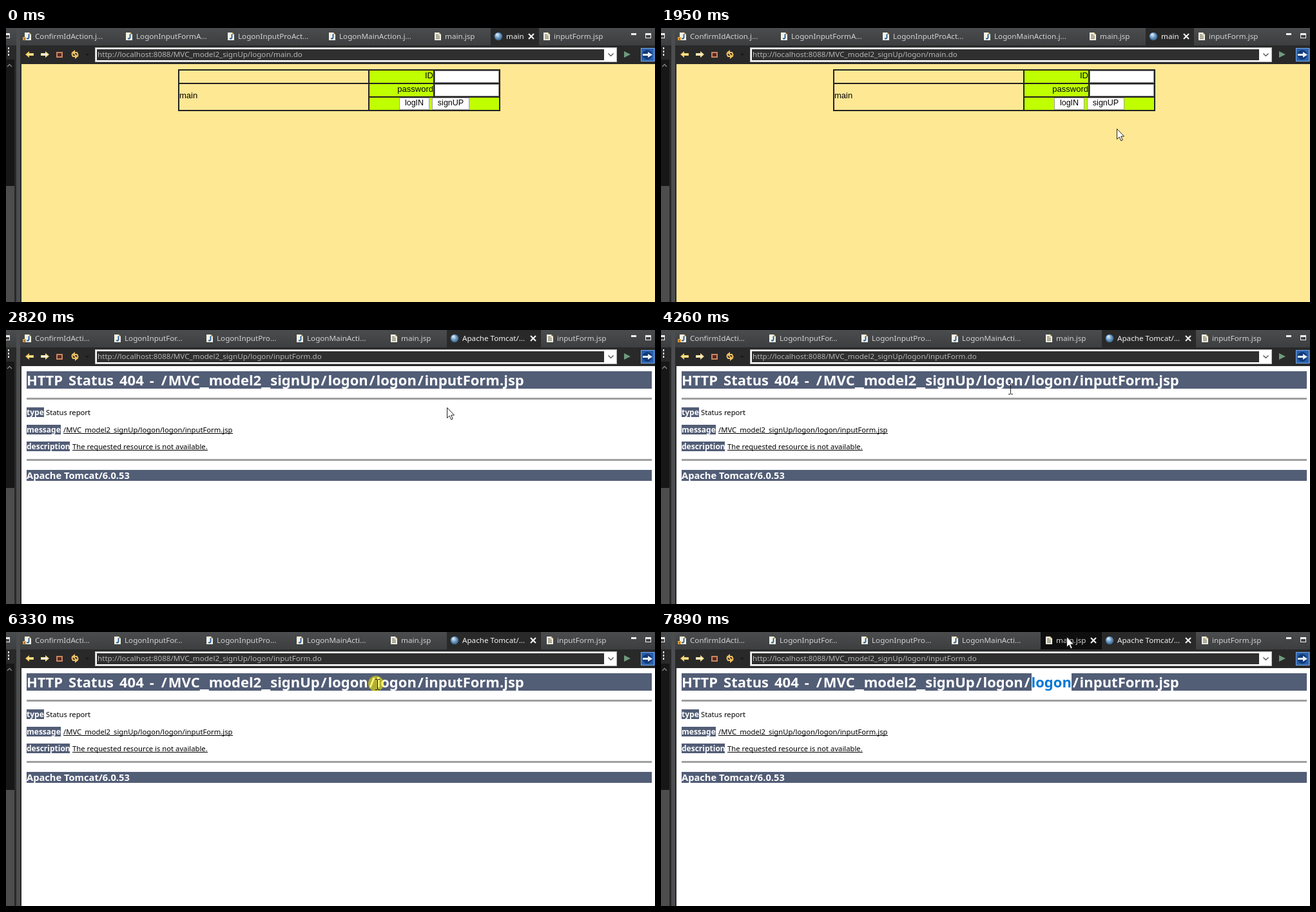
These frames come from a looping animation (1007x425 px, 8 s). An HTML page with a canvas:

```html
<!DOCTYPE html>
<html lang="en">
<head>
<meta charset="utf-8">
<title>Browser tab demo</title>
<style>
  html, body { margin: 0; width: 100%; height: 100%; overflow: hidden; background: #2b2b2b; }
  canvas { display: block; }
</style>
</head>
<body>
<canvas id="stage" width="1007" height="425"></canvas>
<script>
const ctx = document.getElementById('stage').getContext('2d');
const LOOP = 8000, PAGE_SWITCH = 2820;

const UI = '11.65px "Noto Sans", "Open Sans", sans-serif';
const BODY = '11.25px "Noto Sans", "Open Sans", sans-serif';
const LABEL = 'bold 12px "Noto Sans", "Open Sans", sans-serif';
const HEAD = 'bold 22px "Noto Sans", "Open Sans", sans-serif';
const FOOT = 'bold 14.7px "Noto Sans", "Open Sans", sans-serif';
const FORM = '13px "Liberation Sans", Arial, sans-serif';
const BUTTON = '12.5px "Liberation Sans", Arial, sans-serif';
const SLATE = '#525d76', DARK = '#292929';

// Pointer runs: first step, last step, number of steps, end point.
const START = [943, 360];
const RUNS = [
  [280, 500, 3, 847, 311],
  [1050, 1390, 4, 847, 307],
  [1500, 1830, 4, 718, 174],
  [1950, 2150, 3, 684, 120],
  [3360, 3480, 2, 684, 121],
  [3710, 4480, 8, 492, 80],
  [4900, 5360, 5, 547, 81],
  [5580, 5800, 3, 572, 91],
  [6130, 6130, 1, 574, 80],
  [6440, 6890, 5, 627, 80],
  [7010, 7130, 2, 631, 80],
  [7350, 7350, 1, 633, 90],
  [7570, 7890, 4, 629, 7]
];
const PRESSES = [[2610, 2700], [4790, 5580], [6130, 7350]];

function pointerAt(t) {
  let [x, y] = START;
  for (const [t0, t1, n, ex, ey] of RUNS) {
    if (t < t0) break;
    const dt = (t1 - t0) / (n - 1) || 1;
    const p = Math.min(n, Math.floor((t - t0) / dt + 1e-6) + 1) / n;
    x += (ex - x) * p;
    y += (ey - y) * p;
  }
  return { x: Math.round(x), y: Math.round(y) };
}

function rect(x, y, w, h, color) {
  ctx.fillStyle = color;
  ctx.fillRect(x, y, w, h);
}

function frame(x, y, w, h, color, line = 1) {
  ctx.strokeStyle = color;
  ctx.lineWidth = line;
  ctx.strokeRect(x + line / 2, y + line / 2, w - line, h - line);
}

function text(str, x, y, font, color, align = 'left') {
  ctx.font = font;
  ctx.fillStyle = color;
  ctx.textAlign = align;
  ctx.fillText(str, x, y);
}

function trace(points) {
  ctx.beginPath();
  points.forEach(([x, y]) => ctx.lineTo(x, y));
}

function poly(points, fill) {
  trace(points);
  ctx.closePath();
  ctx.fillStyle = fill;
  ctx.fill();
}

function polyline(points, color, width) {
  trace(points);
  ctx.strokeStyle = color;
  ctx.lineWidth = width;
  ctx.stroke();
}

function disc(x, y, r, fill) {
  ctx.beginPath();
  ctx.arc(x, y, r, 0, Math.PI * 2);
  ctx.fillStyle = fill;
  ctx.fill();
}

function fade(y0, y1, top, bottom) {
  const g = ctx.createLinearGradient(0, y0, 0, y1);
  g.addColorStop(0, top);
  g.addColorStop(1, bottom);
  return g;
}

// ---- window chrome ----

function pageIcon(x, java) {
  poly([[x, 7], [x + 7, 7], [x + 10, 10], [x + 10, 19], [x, 19]], '#f4f1e4');
  poly([[x + 7, 7], [x + 10, 10], [x + 7, 10]], '#c9a750');
  if (java) {
    polyline([[x + 6.5, 9.5], [x + 6.5, 15], [x + 5.5, 16.5], [x + 3, 16.3]], '#1f5b9c', 1.8);
  } else {
    rect(x + 2, 10, 4, 1, '#6d6d5a');
    for (const y of [12, 14, 16]) rect(x + 2, y, 6, 1, '#6d6d5a');
  }
}

function globe(x, y) {
  const g = ctx.createRadialGradient(x - 2, y - 3, 1, x, y, 7);
  g.addColorStop(0, '#d5e6f4');
  g.addColorStop(0.5, '#6f9cc4');
  g.addColorStop(1, '#2c5580');
  disc(x, y, 6.3, g);
}

function cross(x, y) {
  polyline([[x - 4, y - 4], [x + 4, y + 4]], '#f2f2f2', 2.2);
  polyline([[x + 4, y - 4], [x - 4, y + 4]], '#f2f2f2', 2.2);
}

function tab(x, label, java) {
  pageIcon(x - 16, java);
  text(label, x, 17, UI, '#d2d2d2');
}

function windowIcon(x) {
  frame(x, 8, 9, 8, '#f0f0f0');
  rect(x, 8, 9, 3, '#f0f0f0');
}

function tabs(second, hover) {
  const active = second ? [684, 146] : [752, 75];
  rect(active[0], 0, active[1], 27, DARK);
  if (hover) {
    rect(589, 0, 95, 27, '#0e0e0e');
    cross(671, 13);
  }
  const names = second
    ? ['ConfirmIdActi...', 'LogonInputFor...', 'LogonInputPro...', 'LogonMainActi...']
    : ['ConfirmIdAction.j...', 'LogonInputFormA...', 'LogonInputProAct...', 'LogonMainAction.j...'];
  const places = second ? [45, 184, 327, 467] : [45, 202, 360, 517];
  names.forEach((name, i) => tab(places[i], name, true));
  rect(26, 14, 5, 5, '#e0a040');
  rect(28, 16, 1, 2, '#5a3a10');
  tab(second ? 613 : 681, 'main.jsp');
  tab(second ? 855 : 850, 'inputForm.jsp');
  globe(second ? 696 : 764, 13);
  text(second ? 'Apache Tomcat/...' : 'main', second ? 708 : 776, 17, UI, '#f2f2f2');
  cross(second ? 818 : 815, 13);
  rect(970, 8, 8, 3, '#f0f0f0');
  windowIcon(992);
}

function arrowIcon(x, dir, fill, core) {
  const p = [[-7, 0], [-1, -5], [-1, -2], [6, -2], [6, 2], [-1, 2], [-1, 5]];
  poly(p.map(([dx, dy]) => [x + dx * dir, 41 + dy]), fill);
  polyline([[x - 4 * dir, 41], [x + 5 * dir, 41]], core, 1.6);
}

function refreshIcon(x, y) {
  for (const d of [1, -1]) {
    const at = (points) => points.map(([dx, dy]) => [x + dx * d, y + dy * d]);
    polyline(at([[-1, -3], [3, -3], [4.5, 0], [4, 3]]), '#f0c060', 2);
    poly(at([[-5, -3], [0, -7], [0, 1]]), '#f0c060');
  }
}

function externalIcon() {
  rect(985, 31, 22, 21, '#2a60ad');
  frame(985, 31, 21, 21, '#79a9e0');
  disc(995, 41.5, 7.5, '#123a78');
  rect(988, 40, 9, 3, '#e8f0fa');
  poly([[996, 37], [1003, 41.5], [996, 46]], '#e8f0fa');
}

function toolbar(second, hover) {
  rect(22, 27, 985, 29, DARK);
  arrowIcon(37, 1, '#f5c95e', '#ffeeb0');
  arrowIcon(60, -1, '#f7dc92', '#ffffff');
  frame(78, 37, 10, 9, '#c98560', 2);
  rect(80, 39, 6, 5, '#5a2a22');
  refreshIcon(107, 41);
  poly([[123, 40], [129, 40], [126, 43]], '#151515');

  rect(138, 30, 810, 23, '#ffffff');
  frame(138, 30, 810, 23, hover ? '#0078d7' : '#b5b5b5');
  rect(141, 33, 787, 17, '#2f2f2f');
  polyline([[934.5, 39.5], [938.5, 43.5], [942.5, 39.5]], '#444444', 1.2);
  const file = second ? 'inputForm.do' : 'main.do';
  text('http://localhost:8088/MVC_model2_signUp/logon/' + file, 142, 45, UI, '#b4b4b4');

  poly([[959, 36], [969, 41], [959, 46]], '#6f9a7c');
  externalIcon();
}

function sidebar() {
  rect(0, 27, 24, 398, DARK);
  rect(0, 49, 13, 376, '#171717');
  rect(0, 245, 13, 180, '#4d4d4d');
  rect(16, 0, 6, 425, '#4b4d4f');
  windowIcon(-3);
  for (let y = 30; y < 43; y += 5) rect(3, y, 2, 3, '#f0f0f0');
  polyline([[2, 60], [5.5, 56.5], [9, 60]], '#8a8a8a', 1.3);
}

function chrome(second, p, shown) {
  const over = second && shown && p.x > 589 && p.x < 684;
  rect(0, 0, 1007, 27, fade(0, 27, '#4a4c4e', '#3c3e40'));
  sidebar();
  tabs(second, over && p.y < 27);
  toolbar(second, over && p.y >= 30 && p.y < 53);
}

// ---- pages ----

function button(x, w, label) {
  rect(x, 108, w, 19, '#ffffff');
  frame(x, 108, w, 19, '#a0a0a0');
  text(label, x + w / 2, 120, BUTTON, '#000000', 'center');
}

function formPage() {
  const line = '#222222';
  rect(24, 56, 983, 369, '#ffe894');
  rect(564, 66, 201, 61, '#bfff00');
  frame(267, 64, 500, 65, line, 2);
  rect(562, 64, 2, 65, line);
  rect(267, 85, 500, 2, line);
  rect(562, 106, 205, 2, line);
  rect(663, 64, 2, 43, line);
  for (const y of [66, 87]) {
    rect(665, y, 100, 19, '#ffffff');
    frame(665, y, 100, 19, '#8a8a8a');
  }
  text('ID', 663, 78, FORM, '#000000', 'right');
  text('password', 663, 99, FORM, '#000000', 'right');
  text('main', 269, 109, FORM, '#000000');
  button(610, 47, 'logIN');
  button(661, 58, 'signUP');
}

// Separators in the heading are set wider than the font's own.
const GAPS = { ' ': 9, '/': 12.7, '_': 14 };

function layout(str, x) {
  ctx.font = HEAD;
  return [...str].map(ch => {
    const own = ctx.measureText(ch).width;
    const w = GAPS[ch] || own;
    const glyph = { ch, x, w, inset: ch === ' ' ? 0 : (w - own) / 2 };
    x += w;
    return glyph;
  });
}

function drawGlyphs(glyphs, color) {
  for (const g of glyphs) {
    if (g.ch === '_') rect(g.x, 89, g.w, 2, color);
    else text(g.ch, g.x + g.inset, 86, HEAD, color);
  }
}

// A letter joins the selection once the pointer enters it.
function select(glyphs, endX) {
  const chosen = glyphs.filter(g => g.x < endX);
  if (!chosen.length) return;
  const last = chosen[chosen.length - 1];
  const left = Math.round(chosen[0].x);
  rect(left, 64, Math.round(last.x + last.w) - left, 27, '#ffffff');
  drawGlyphs(chosen, '#0078d7');
}

function heading(t) {
  const path = layout('/MVC_model2_signUp/logon/logon/inputForm.jsp', 239);
  rect(32, 64, 970, 27, SLATE);
  drawGlyphs(layout('HTTP Status 404 -', 32), '#ffffff');
  drawGlyphs(path, '#ffffff');
  const endX = until => pointerAt(Math.min(t, until)).x + 2;
  if (t >= 4900 && t < 6130) select(path.slice(18, 24), endX(5500));
  if (t >= 6440) select(path.slice(25, 30), endX(7200));
}

function row(y, label, w, value, underline) {
  rect(32, y, w, 15, SLATE);
  text(label, 32, y + 12, LABEL, '#ffffff');
  const x = 32 + w + (underline ? 4 : 3);
  text(value, x, y + 12, BODY, '#000000');
  if (underline) rect(x, y + 13, Math.round(ctx.measureText(value).width), 1, '#000000');
}

function errorPage(t) {
  rect(24, 56, 983, 369, '#ffffff');
  heading(t);
  rect(32, 105, 970, 3, '#a0a0a0');
  row(120, 'type', 27, 'Status report', false);
  row(147, 'message', 53, '/MVC_model2_signUp/logon/logon/inputForm.jsp', true);
  row(173, 'description', 67, 'The requested resource is not available.', true);
  rect(32, 200, 970, 3, '#a0a0a0');
  rect(32, 217, 970, 17, SLATE);
  text('Apache Tomcat/6.0.53', 32, 231, FOOT, '#ffffff');
}

// ---- pointer ----

function arrow(x, y) {
  const shape = [[0, 0], [0, 16], [3.7, 12.6], [6.3, 18.4], [8.8, 17.3], [6.2, 11.7], [11, 11.5]]
    .map(([dx, dy]) => [x + 0.5 + dx, y + 0.5 + dy]);
  poly(shape, '#ffffff');
  polyline([...shape, shape[0]], '#222222', 1);
}

function beam(x, y) {
  rect(x, y - 7, 1, 15, '#222222');
  for (const dy of [-8, 8]) {
    rect(x - 3, y + dy, 3, 1, '#222222');
    rect(x + 1, y + dy, 3, 1, '#222222');
  }
}

function pointer(t, p, second) {
  if (PRESSES.some(([a, b]) => t >= a && t < b)) disc(p.x, p.y, 12, 'rgba(255,240,0,0.55)');
  const onHeading = second && p.y >= 64 && p.y < 95 && p.x < 802;
  const onAddress = second && p.y >= 33 && p.y < 50;
  if (onHeading || onAddress) beam(p.x + 2, p.y + 1);
  else arrow(p.x, p.y);
}

function draw(t) {
  const second = t >= PAGE_SWITCH, shown = t >= RUNS[0][0];
  const p = pointerAt(t);
  chrome(second, p, shown);
  if (second) errorPage(t);
  else formPage();
  if (shown) pointer(t, p, second);
}

const begin = performance.now();
function tick() {
  draw((performance.now() - begin) % LOOP);
  requestAnimationFrame(tick);
}
tick();
</script>
</body>
</html>
```
